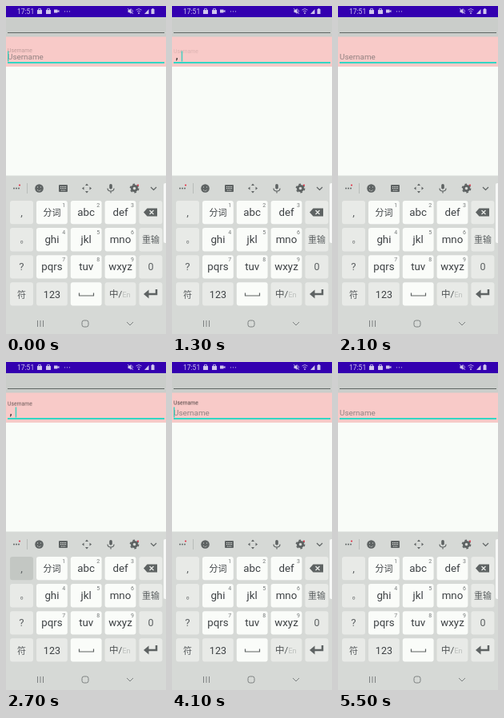
Write an HTML page that moves like this. It is 200 by 411 pixels and loops after 6000 ms.

```html
<!DOCTYPE html>
<html lang="zh-CN">
<head>
<meta charset="utf-8">
<title>Floating label</title>
<style>
html, body { margin: 0; width: 100%; height: 100%; overflow: hidden; }
svg { display: block; width: 100%; height: 100%; }
text { font-family: Roboto, "Noto Sans CJK SC", "Noto Sans CJK", sans-serif; }
.key { fill: #fafcf9; }
.side { fill: #e8eae7; }
.cap { fill: #3d4144; text-anchor: middle; }
.soft { fill: #5c6062; }
.digit { fill: #777b7b; font-size: 7px; text-anchor: middle; }
.icon { fill: #5e6363; }
.line { fill: none; stroke: #5e6363; stroke-width: 1.2; }
.nav { fill: none; stroke: #7c8080; }
.dots { fill: none; stroke-linecap: round; }
.status { fill: #cfc6ec; }
.status path.thin { fill: none; stroke: #cfc6ec; stroke-width: .8; }
</style>
</head>
<body>
<svg viewBox="0 0 200 411" preserveAspectRatio="none">
  <rect width="200" height="411" fill="#f9fcf8"/>
  <rect width="200" height="14" fill="#3300b0"/>
  <rect y="14" width="200" height="25" fill="#cacdca"/>
  <rect y="38.5" width="200" height="37.5" fill="#f8cac8"/>
  <path d="M2 33.5H198" stroke="#606663"/>
  <path d="M2 71H198" stroke="#33d6c4" stroke-width="1.800"/>

  <g class="status">
    <text x="14" y="10" font-size="8.5">17:51</text>
    <path d="M39 5h6v5h-6zM50 5h6v5h-6zM60 4.5h4.500v4H60zM64.500 6l2-1v3l-2-1z"/>
    <path class="thin" d="M40.500 5V3.500h3V5M51.500 5V3.500h3V5"/>
    <path class="dots" d="M73.500 6.800h6.100" stroke="#cfc6ec" stroke-width="1.300" stroke-dasharray="0 3"/>
    <path d="M152.500 5h1.500l2.500-2v7l-2.500-2h-1.500zM173 10l5.500-6v6zM181.500 4h1v-1h2v1h1v6h-4z"/>
    <path class="thin" d="M152 3l7 7M157.500 4.500q2 2 0 4M162.500 5q3.500-3 7 0M164 7q2-2 4 0"/>
    <circle cx="166" cy="9" r=".9"/>
  </g>

  <text id="hint" x="2" y="67" font-size="9.9" fill="#918180">Username</text>
  <text id="label" x="2" font-size="6.8" fill="#111">Username</text>
  <g font-size="12" font-weight="500" fill="#262626">
    <text id="first" x="4.800" y="67">,</text>
    <text id="second" x="14.600" y="67">,</text>
  </g>
  <rect id="cursor" y="56.500" width="1.300" height="13" fill="#2cd0bd"/>

  <rect y="212.500" width="200" height="199" fill="#d6d9d6"/>
  <path class="dots" d="M10 228.500h6.100" stroke="#5e6363" stroke-width="1.900" stroke-dasharray="0 3"/>
  <path d="M26.500 222v13" stroke="#b9bdba"/>
  <g class="icon">
    <circle cx="41.500" cy="228.500" r="5.300"/>
    <rect x="66" y="224" width="11" height="9" rx="1"/>
    <rect x="129.200" y="223" width="3.600" height="6.500" rx="1.800"/>
    <path d="M99 225l2-2.500 2 2.500zM99 232l2 2.500 2-2.500zM97.500 226.500l-2.500 2 2.500 2zM104.500 226.500l2.500 2-2.500 2z"/>
  </g>
  <path d="M39 227h1M43 227h1M39 230q2.500 3 5 0M68 226.500h7M68 228.500h7M69 231h5" fill="none" stroke="#d6d9d6" stroke-dasharray="1.200 .8"/>
  <path class="line" d="M127 228.500q0 3.500 4 3.500t4-3.500M131 232v2.500M181 227l3.500 3.500 3.500-3.500"/>
  <g fill="none" stroke="#5e6363">
    <circle cx="160.500" cy="228.500" r="3.200" stroke-width="2.800"/>
    <circle cx="160.500" cy="228.500" r="5" stroke-width="1.800" stroke-dasharray="2.600 2.636"/>
  </g>
  <g fill="#e3384d"><circle cx="17" cy="224.500" r="1.100"/><circle cx="165" cy="224.500" r="1.100"/></g>

  <g id="keys"></g>

  <path class="icon" d="M172 258.500l4.500-5H189v10h-12.500z"/>
  <path d="M179.500 256l5 5M184.500 256l-5 5" stroke="#e8eae7" stroke-width="1.300"/>
  <path class="line" d="M91.500 359.500v3.500h18v-3.500"/>
  <path class="line" d="M188 355v6h-11" stroke-width="2.500" style="stroke-width:2.500"/>
  <path class="icon" d="M172 361l6.500-5.500v11z"/>
  <path d="M200 222h-1q-2 0-2 2v71q0 2 2 2h1z" fill="#f7f8f7"/>
  <path class="nav" d="M39.500 394v8M43 394v8M46.500 394v8M151 396l4 4 4-4"/>
  <rect class="nav" x="95" y="394" width="8" height="8" rx="2.500"/>
</svg>
<script>
const LOOP = 6000, STEP = 100, FLOAT = 400;
const $ = id => document.getElementById(id);

function add(tag, attrs, content = "") {
  const el = document.createElementNS("http://www.w3.org/2000/svg", tag);
  for (const name in attrs) el.setAttribute(name, attrs[name]);
  el.textContent = content;
  return $("keys").appendChild(el);
}

const rows = [
  [",", "分词", "abc", "def", ""],
  ["。", "ghi", "jkl", "mno", "重输"],
  ["?", "pqrs", "tuv", "wxyz", "0"],
  ["符", "123", "", "", ""]
];

function drawKey(cap, row, col) {
  const outer = col % 4 === 0, bottom = row === 3;
  const width = outer ? 29 : 38.8;
  const x = col ? 38 + (col - 1) * 42.8 : 5;
  const y = 244 + row * 34.1;
  const han = /[\u4e00-\u9fff]/.test(cap), stop = cap === "。";
  const size = han || stop ? 11 : /\d/.test(cap) ? 12.5 : 13.3;
  const grey = outer || (bottom && col !== 2);
  const pad = add("rect", {x, y, width, height: 29.3, rx: 3, class: grey ? "side" : "key"});
  add("text", {
    x: x + width / 2 + (stop ? 3.5 : 0), y: y + 19.2,
    class: outer ? "cap soft" : "cap", "font-size": size
  }, cap);
  if (!outer && !bottom) add("text", {x: x + width - 4.5, y: y + 7.5, class: "digit"}, row * 3 + col);
  return pad;
}
const pads = rows.map((row, r) => row.map((cap, c) => drawKey(cap, r, c)));
add("text", {x: 129, y: 364.5, "font-size": 11.5, fill: "#4c5052"}, "中/");
add("text", {x: 145.5, y: 364.5, "font-size": 9, fill: "#bcc0bd"}, "En");

const comma = pads[0][0], erase = pads[0][4], clear = pads[1][4];
const edits = [
  {at: -300, count: 0},
  {at: 450, count: 1, pad: comma},
  {at: 900, count: 0, pad: erase},
  {at: 1250, count: 1},
  {at: 1700, count: 0, pad: clear},
  {at: 2450, count: 1, pad: comma},
  {at: 2850, count: 2, pad: comma},
  {at: 4000, count: 0, pad: erase}
];
const blinks = [[2100, 2400], [3300, 3600], [4600, 5000], [5500, LOOP]];

const countAt = t => edits.findLast(edit => edit.at <= t).count;
const within = (t, [from, to]) => t >= from && t < to;

// How far the label has floated up: 0 is hidden in the field, 1 is at rest above it.
function floatAt(t) {
  const filled = countAt(t) > 0;
  const turn = edits.findLast((edit, i) =>
    edit.at <= t && (edit.count > 0) === filled && !(i && (edits[i - 1].count > 0) === filled));
  const progress = Math.min(1, (t - turn.at) / FLOAT);
  return filled ? progress : 1 - progress;
}

// Samples a rule over the loop and holds each sample for one step.
function play(el, rule) {
  const frames = [];
  for (let t = 0; t <= LOOP; t += STEP) {
    frames.push({offset: t / LOOP, easing: "step-end", ...rule(Math.min(t, LOOP - STEP))});
  }
  el.animate(frames, {duration: LOOP, iterations: Infinity});
}
const show = (id, test) => play($(id), t => ({opacity: test(t) ? 1 : 0}));

show("hint", t => countAt(t) === 0);
show("first", t => countAt(t) > 0);
show("second", t => countAt(t) > 1);
show("cursor", t => !blinks.some(blink => within(t, blink)));
play($("cursor"), t => ({transform: `translateX(${2 + 9.7 * countAt(t)}px)`}));
play($("label"), t => ({opacity: floatAt(t), transform: `translateY(${60 - 9 * floatAt(t)}px)`}));
for (const pad of [comma, erase, clear]) {
  const down = t => edits.some(edit => edit.pad === pad && within(t, [edit.at - 150, edit.at]));
  play(pad, t => ({fill: down(t) ? "#c3c7c3" : "#e8eae7"}));
}
</script>
</body>
</html>
```
